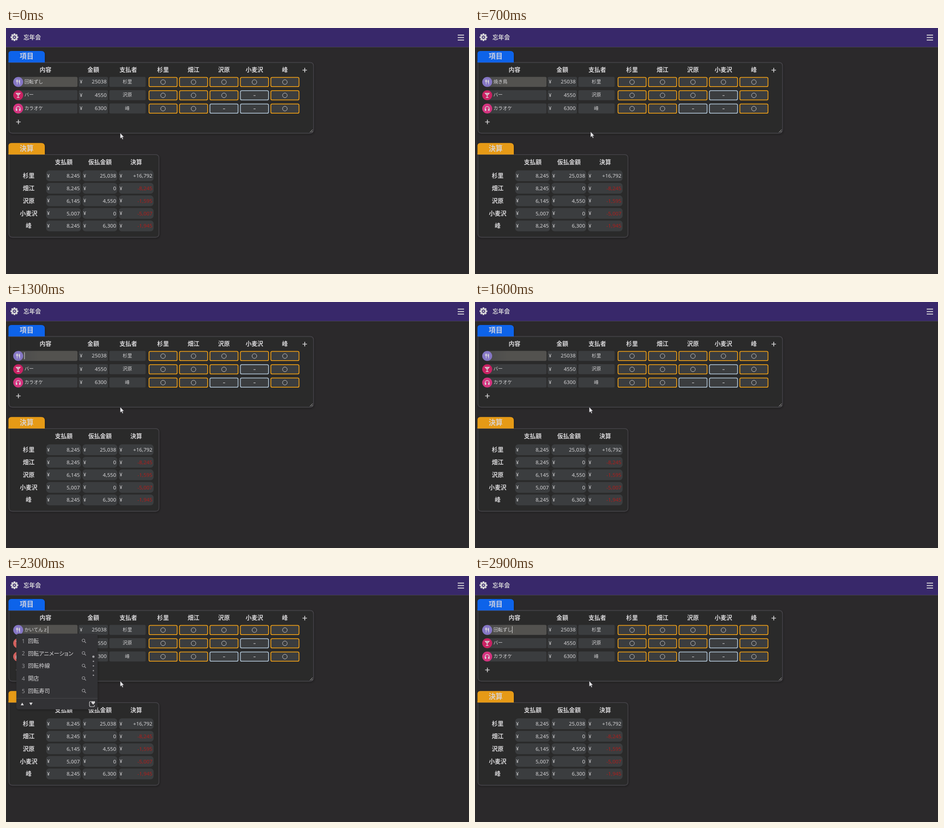
These frames come from a looping animation (1026x546 px, 3000 ms). An HTML page:

```html
<!DOCTYPE html>
<html lang="ja">
<head>
<meta charset="utf-8">
<title>忘年会</title>
<style>
  html, body { margin: 0; width: 100%; height: 100%; overflow: hidden; background: #2b292b; }
  svg { display: block; width: 1026px; height: 546px; }
  text { font-family: "Noto Sans", "Noto Sans CJK JP", "Noto Sans CJK", sans-serif; white-space: pre; }
  .popup text { font-feature-settings: "palt"; }
</style>
</head>
<body>
<svg id="stage" viewBox="0 0 1026 546" xmlns="http://www.w3.org/2000/svg"></svg>
<script>
const LOOP = 3000, STEP = 100;
const INK = '#d7d6d8', CELL = '#3b3d3f', ORANGE = '#e69a17', PALE = '#a9bccc';
const stage = document.getElementById('stage');

// y is the vertical middle of the glyphs
const text = (x, y, s, size = 10.4, anchor = 'start', fill = INK, weight = 400) =>
  `<text x="${x}" y="${y + size * 0.37}" font-size="${size}" text-anchor="${anchor}" fill="${fill}" font-weight="${weight}">${s}</text>`;
const bold = (x, y, s, size = 13, fill = INK) => text(x, y, s, size, 'middle', fill, 700);
const number = (x, y, s, fill) => text(x, y, s, 11.5, 'end', fill);
const rect = (x, y, w, h, fill, r = 0, extra = '') =>
  `<rect x="${x}" y="${y}" width="${w}" height="${h}" rx="${r}" fill="${fill}" ${extra}/>`;
const line = (d, width = 1.5, color = INK, extra = '') =>
  `<path d="${d}" fill="none" stroke="${color}" stroke-width="${width}" ${extra}/>`;
const plus = (x, y) => line(`M${x - 5} ${y}h10M${x} ${y - 5}v10`, 1.7);

const members = ['杉里', '畑江', '沢原', '小麦沢', '峰'];
const items = [
  { name: '', price: '25038', payer: 0, join: '11111', color: '#8576c4' },
  { name: 'バー', price: '4550', payer: 2, join: '11101', color: '#c92263' },
  { name: 'カラオケ', price: '6300', payer: 4, join: '11001', color: '#d4347f' }
];
const totals = [
  ['8,245', '25,038', '+16,792'],
  ['8,245', '0', '-8,245'],
  ['6,145', '4,550', '-1,595'],
  ['5,007', '0', '-5,007'],
  ['8,245', '6,300', '-1,945']
];

const icons = [
  line('M-4-5v3.2q0 1.8 1.7 1.8q1.7 0 1.7-1.8V-5M-2.3-5V5.5', 1.2) +
    `<path d="M4 5.5H2.7V1.5H1.2Q1-4 4-5.5Z" fill="${INK}"/>`,
  line('M-4.5-4.5h9L0 .8ZM0 .8V5M-3 5h6M-3-2.5h6', 1.4),
  line('M-4.5 3V0a4.5 4.5 0 0 1 9 0V3', 1.5) +
    rect(-5.2, 0.3, 3, 5, INK, 1) + rect(2.2, 0.3, 3, 5, INK, 1)
];

function header() {
  let teeth = '';
  for (let i = 0; i < 8; i++)
    teeth += `<rect x="-2" y="-8.6" width="4" height="4" rx="1" fill="${INK}" transform="rotate(${i * 45})"/>`;
  return rect(0, 0, 1026, 42, '#38286a') + rect(0, 42, 1026, 1, '#47434f') +
    `<g transform="translate(18.7 20.5)">${teeth}<circle r="5" fill="none" stroke="${INK}" stroke-width="3"/><circle r="1.8" fill="${INK}"/></g>` +
    bold(58, 20.5, '忘年会', 12.8) +
    line('M1001 15.8h14M1001 21.3h14M1001 26.8h14', 1.9);
}

function panel(y, width, height, title, color, ink) {
  const right = 6.5 + width, bottom = y + height;
  const frame = `M6.5 ${y}H${right - 8}q8 0 8 8V${bottom - 8}q0 8-8 8H14.5q-8 0-8-8Z`;
  return `<g filter="url(#soft)"><path d="M5.5 ${y}V${y - 19}q0-6.5 6.5-6.5H78q8 0 8 8V${y}Z" fill="${color}"/></g>` +
    `<path d="${frame}" fill="#2b292b" stroke="#424044" stroke-width="1.8" filter="url(#soft)"/>` +
    `<rect x="5.5" y="${y - 3}" width="80.5" height="3" fill="${color}"/>` +
    bold(45.7, y - 14, title, 15.5, ink);
}

function itemTable() {
  let out = panel(76.5, 675, 157, '項目', '#1163ea', '#cbd0e2');
  [['内容', 87.5], ['金額', 193.5], ['支払者', 271]].forEach(([s, x]) => out += bold(x, 92, s));
  members.forEach((m, i) => out += bold(348 + i * 67.5, 92, m));
  out += plus(662, 93.5) + plus(27.5, 208.5);
  items.forEach((item, row) => {
    const y = 119.7 + row * 29.5;
    out += rect(24, y - 11.2, 134.5, 22.3, row ? CELL : 'url(#focus)', 3) +
      rect(161, y - 11.2, 65, 22.3, CELL, 3) + rect(229, y - 11.2, 80.5, 22.3, CELL, 3) +
      `<circle class="badge" cx="27" cy="${y}" r="11" fill="${item.color}"/>` +
      `<g transform="translate(27 ${y})">${icons[row]}</g>` +
      text(40.7, y - 0.7, item.name) + text(163.5, y - 0.5, '¥', 10.5) +
      number(223, y - 0.5, item.price) + text(269, y - 0.7, members[item.payer], 10.4, 'middle');
    [...item.join].forEach((on, i) => {
      const x = 316 + i * 67.5;
      out += rect(x + 0.9, y - 10.1, 62.4, 20.6, CELL, 3, `stroke="${+on ? ORANGE : PALE}" stroke-width="1.8"`) +
        (+on ? `<circle cx="${x + 32}" cy="${y + 0.3}" r="5.2" fill="none" stroke="${INK}" stroke-width="0.9"/>`
             : line(`M${x + 30} ${y + 0.8}h4.5`, 1.1));
    });
  });
  return out + line('M673.5 231.5l6-6M677 231.5l2.5-2.5', 1, '#b8b8b8');
}

function totalTable() {
  let out = panel(280.8, 332.5, 183.7, '決算', ORANGE, '#d9d0c9');
  ['支払額', '仮払金額', '決算'].forEach((s, i) => out += bold(128 + i * 80.3, 297.5, s));
  totals.forEach((row, r) => {
    const y = 328 + r * 27.8;
    out += bold(50.3, y - 0.7, members[r]);
    row.forEach((value, c) => {
      const x = 89 + c * 80.4;
      out += rect(x, y - 12, 77.3, 24, CELL, 7) + text(x + 2, y, '¥', 10.5) +
        number(x + 74.6, y, value, value[0] === '-' ? '#ae1e1c' : INK);
    });
  });
  return out;
}

function popup(width, words) {
  const right = 23 + width;
  let out = rect(23, 128, width, 168, '#333236', 5, 'filter="url(#soft)"') +
    rect(23, 271, width, 1, '#48474b');
  words.forEach((word, i) => {
    const y = 144.2 + i * 27.8;
    out += text(35, y, i + 1, 12, 'start', '#98979b') + text(48.7, y, word, 12.2) +
      `<circle cx="${right - 31.3}" cy="${y - 1.2}" r="3.1" fill="none" stroke="#b5b4b8"/>` +
      line(`M${right - 29} ${y + 1.1}l3.2 3.2`, 1.1, '#b5b4b8');
  });
  for (let i = 0; i < 5; i++)
    out += `<circle cx="${right - 9.3}" cy="${179 + i * 10.3}" r="${i ? 1.5 : 2.5}" fill="#a09fa3"/>`;
  const x = right - 12.5;
  out += `<path d="M32.5 287l3.5-6 3.5 6ZM51.5 281h7.5l-3.7 6Z" fill="${INK}"/>` +
    line(`M${x - 1} 278.5h-2q-2.5 0-2.5 2.5v6.5q0 2.5 2.5 2.5h6q2.5 0 2.5-2.5v-1`, 1.2) +
    `<path d="M${x + 2.7} 285.5l-3.8-4q-1-3 1.6-3.7q1.6 0 2.2 1.4q.6-1.4 2.2-1.4q2.6.7 1.6 3.7Z" fill="${INK}"/>`;
  return `<g class="popup" visibility="hidden">${out}</g>`;
}

stage.innerHTML = `<defs>
  <filter id="soft" x="-20%" y="-20%" width="140%" height="150%"><feDropShadow dx="1" dy="2" stdDeviation="2" flood-color="#000" flood-opacity=".3"/></filter>
  <linearGradient id="focus"><stop stop-color="#4a4a4b"/><stop offset=".35" stop-color="#53524f"/></linearGradient>
  </defs>` + rect(0, 0, 1026, 546, '#2b292b') + header() + itemTable() + totalTable() +
  `<g id="typed">${text(40.7, 119, '')}</g><path id="caret" stroke="#e4e4e4" stroke-width="1"/>` +
  popup(143, ['開閉', '開発環境', '解析', '会社', '開発']) +
  popup(180, ['回転', '回転アニメーション', '回転枠線', '開店', '回転寿司']) +
  `<path id="pointer" d="M0 0V12.6L2.9 10 4.9 14.4 6.9 13.5 4.9 9.2H8.6Z" fill="#e6e5e8" stroke="#29272a" stroke-width=".6"/>`;

const typed = stage.querySelector('#typed text');
const caret = stage.querySelector('#caret');
const pointer = stage.querySelector('#pointer');
const popups = stage.querySelectorAll('.popup');
const badges = [...stage.querySelectorAll('.badge')];

// start time, text, caret shown, candidate list (-1 for none)
const typing = [
  [0, '回転ずし', 0, -1], [100, '焼き鳥', 0, -1], [900, '焼き', 1, -1], [1100, '焼', 1, -1],
  [1300, '', 1, -1], [1500, '', 0, -1], [1700, 'ｋ', 1, -1], [1800, 'か', 1, 0],
  [1900, 'かい', 1, 0], [2000, 'かいｔ', 1, 0], [2100, 'かいて', 1, 1], [2200, 'かいてん', 1, 1],
  [2300, 'かいてんｚ', 1, 1], [2400, 'かいてんず', 1, 1], [2500, 'かいてんずｓ', 1, 1],
  [2600, 'かいてんずし', 1, 1], [2700, '回転ずし', 1, -1]
];

const ease = k => { k = Math.min(1, Math.max(0, k)); return k * k * (3 - 2 * k); };

function draw(ms) {
  const t = Math.floor((ms % LOOP) / STEP) * STEP;
  const [, value, caretOn, list] = typing.filter(s => s[0] <= t).pop();
  typed.textContent = value;
  const x = 41 + value.length * 10.4;
  caret.setAttribute('d', caretOn ? `M${x} 111.5V127` : '');
  popups.forEach((p, i) => p.setAttribute('visibility', i === list ? 'visible' : 'hidden'));
  badges.forEach((b, i) => b.setAttribute('fill', i && list >= 0 ? '#d4625f' : items[i].color));
  const drift = 3 * (ease(t / 500) - ease((t - 700) / 300));
  pointer.setAttribute('transform', `translate(${253 + drift} ${233 - drift})`);
}

const start = performance.now();
function tick() {
  draw(performance.now() - start);
  requestAnimationFrame(tick);
}
tick();
</script>
</body>
</html>
```
